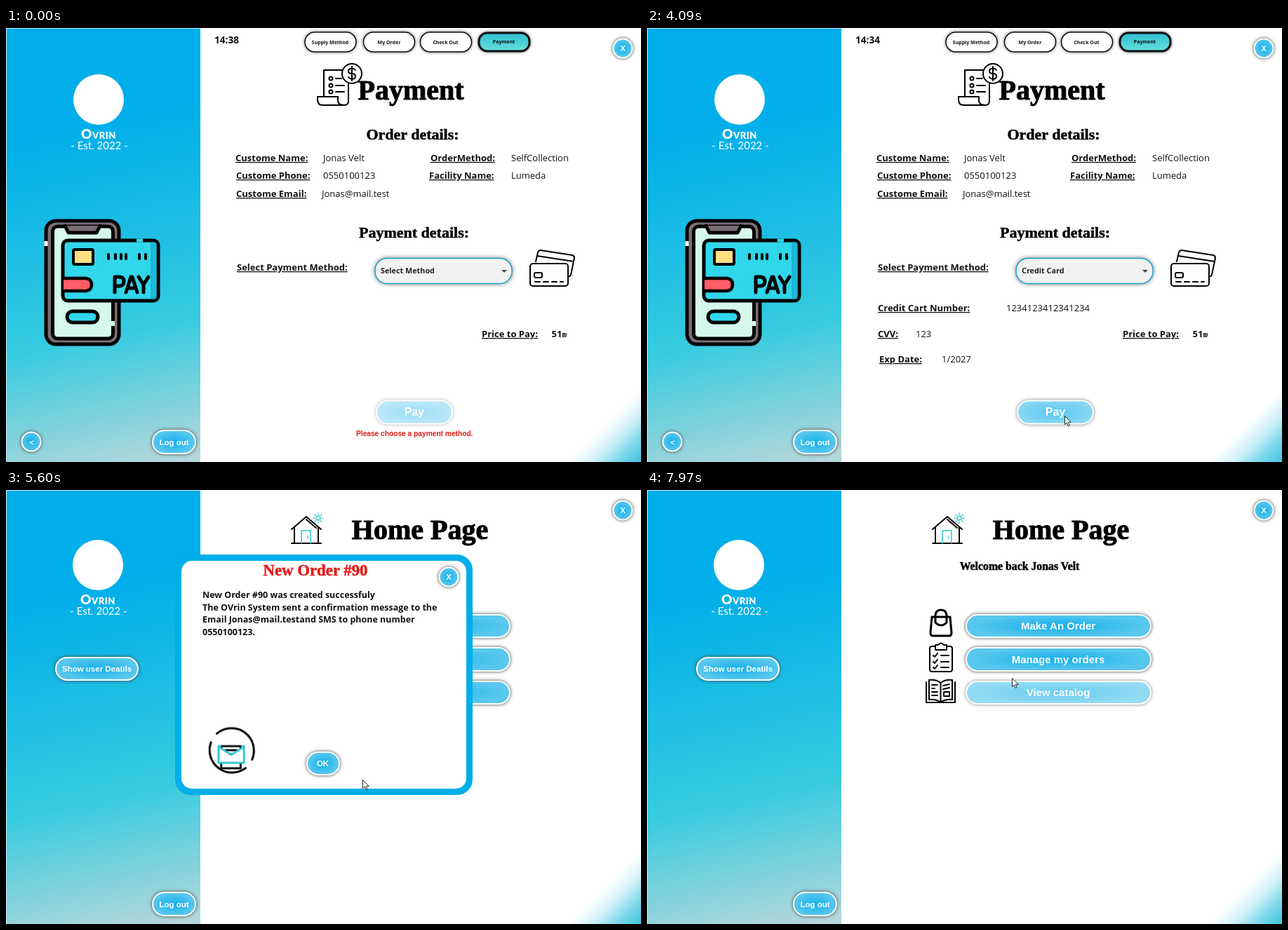
These frames come from a looping animation (905 px wide and 619 px high, 8000 ms). An HTML page:

```html
<!DOCTYPE html>
<html lang="en">
<head>
<meta charset="utf-8">
<title>Payment flow</title>
<style>
html,body{margin:0;width:100%;height:100%;overflow:hidden;background:#fff}
svg{display:block;width:905px;height:619px}
text{font:700 13px "Open Sans","Noto Sans",sans-serif;fill:#111}
.val text,text.val{font-weight:400}
.lab text{text-decoration:underline}
.fat{font:700 22px "Liberation Serif",serif;fill:#000;stroke:#000;stroke-width:.5;text-anchor:middle}
.big{font-size:40px;stroke-width:1}
.combo{font-size:10.8px;fill:#222}
.tab rect{fill:#fff;stroke:#111;stroke-width:1.5;filter:drop-shadow(0 0 2px #666)}
.tab text{font-size:7px;text-anchor:middle}
.pill rect,.pill circle{fill:url(#blue);stroke:#fff;stroke-width:2;filter:drop-shadow(0 0 2.5px #444)}
.pill text{font:700 11.5px "Liberation Sans",Arial,sans-serif;fill:#fff;text-anchor:middle}
.pill .l{font-size:15px}
.ico{fill:none;stroke:#000;stroke-width:2;stroke-linecap:round;stroke-linejoin:round}
.teal{stroke:#2cc6cf}
.brand text{fill:#fff;text-anchor:middle;font:400 15px Lato,sans-serif}
.brand .name{font-weight:900;font-size:19px;font-variant:small-caps;letter-spacing:.5px}
.desk text{font-size:11px;font-weight:400;fill:#fff;text-anchor:middle;filter:drop-shadow(1px 1px 1px #000)}
.note text{font-size:12.5px}

/* hard switches */
.sw{animation:8s step-end infinite}
.in{opacity:0}
.payOut{animation-name:payOut}
.deskOut{animation-name:deskOut}
.dialog{animation-name:dialog}
.c8{animation-name:c8}.c7{animation-name:c7}.c6{animation-name:c6}.c5{animation-name:c5}.c4{animation-name:c4}
.unset{animation-name:unset1}
.chosen{animation-name:chosen}
.popup{animation-name:popup}
.hot{animation-name:hot}
.payBtn{animation-name:payBtn}
.okBtn{animation-name:okBtn}
.catBtn{animation-name:catBtn}
.click{animation-name:click}
.arrow{animation-name:arrow}
@keyframes payOut{0%{opacity:1}56%,100%{opacity:0}}
@keyframes deskOut{0%{opacity:1}60.125%,100%{opacity:0}}
@keyframes dialog{60.125%{opacity:1}93%{opacity:0}}
@keyframes c8{0%{opacity:1}6.75%{opacity:0}}
@keyframes c7{6.75%{opacity:1}19.25%{opacity:0}}
@keyframes c6{19.25%{opacity:1}32%{opacity:0}}
@keyframes c5{32%{opacity:1}44.5%{opacity:0}}
@keyframes c4{44.5%,100%{opacity:1}}
@keyframes unset1{0%{opacity:1}31.125%{opacity:0}}
@keyframes chosen{31.125%,100%{opacity:1}}
@keyframes popup{17.75%{opacity:1}32%{opacity:0}}
@keyframes hot{23.75%,100%{opacity:1}}
@keyframes payBtn{0%{opacity:.42}31.125%{opacity:1}43.6%,100%{opacity:.72}}
@keyframes okBtn{0%{opacity:1}73%,100%{opacity:.7}}
@keyframes catBtn{0%{opacity:1}98%,100%{opacity:.65}}
@keyframes click{15.875%{opacity:.75}17.75%{opacity:0}31.125%{opacity:.75}32%{opacity:0}47.625%{opacity:.75}51.125%{opacity:0}92%{opacity:.75}93%{opacity:0}}
@keyframes arrow{0%{fill:#fff}31.125%{fill:#f8d9a8}32%,100%{fill:#fff}}

/* continuous motion */
.cursor{animation:show 8s step-end infinite,move 8s ease-in-out infinite}
@keyframes show{0%{opacity:0}2.5%,100%{opacity:1}}
@keyframes move{
0%,2.5%{transform:translate(850px,578px)}
10.875%,21.75%{transform:translate(623px,339px)}
26.75%,37%{transform:translate(596px,379px)}
46.75%,61.75%{transform:translate(595px,553px)}
70%{transform:translate(508px,413px)}
75%,94.5%{transform:translate(461px,385px)}
99.6%,100%{transform:translate(520px,268px)}}
.ring{transform-origin:321px 372px;animation:ring 8s linear infinite}
@keyframes ring{0%,61%{transform:rotate(0)}79.25%{transform:rotate(61deg)}97.5%,100%{transform:rotate(180deg)}}
.heads{animation:heads 8s linear infinite}
@keyframes heads{0%,67%{opacity:1}70%,88%{opacity:0}91%,100%{opacity:1}}
.mail{transform-origin:321px 376px;animation:mail 8s ease-in-out infinite}
@keyframes mail{0%,66%{transform:translateY(-5px) scale(.8)}72%,86%{transform:none}92%,100%{transform:translateY(-5px) scale(.8)}}
.letter{animation:letter 8s ease-in-out infinite}
@keyframes letter{0%,68%{transform:translateY(18px);opacity:0}69%{transform:translateY(16px);opacity:1}75%,84%{transform:none;opacity:1}90%{transform:translateY(16px);opacity:1}91%,100%{transform:translateY(18px);opacity:0}}
.sun{transform-origin:445px 40px;animation:sun 8s ease-in-out infinite}
@keyframes sun{0%,66%{transform:scale(0)}69%,73%{transform:rotate(45deg)}76%,92%{transform:scale(0)}96%,100%{transform:none}}
</style>
</head>
<body>
<svg viewBox="0 0 905 619">
<defs>
  <linearGradient id="side" gradientUnits="userSpaceOnUse" x1="100" y1="140" x2="205" y2="625">
    <stop offset="0" stop-color="#00aee9"/><stop offset=".6" stop-color="#35cbe0"/><stop offset="1" stop-color="#b4d7da"/>
  </linearGradient>
  <linearGradient id="corner" gradientUnits="userSpaceOnUse" x1="853" y1="567" x2="905" y2="619">
    <stop offset="0" stop-color="#fff"/><stop offset=".35" stop-color="#cdf0f8"/><stop offset=".65" stop-color="#7fd9ec"/><stop offset="1" stop-color="#3fc2df"/>
  </linearGradient>
  <radialGradient id="blue"><stop offset="0" stop-color="#14b0ea"/><stop offset="1" stop-color="#5ac8ee"/></radialGradient>
  <linearGradient id="tabOn" x2="0" y2="1"><stop offset="0" stop-color="#2fbfd6"/><stop offset="1" stop-color="#66dfd8"/></linearGradient>
  <linearGradient id="dark" x1="0" y1="0" x2="0" y2="1"><stop offset="0" stop-color="#5c1506"/><stop offset="1" stop-color="#8c2a0e"/></linearGradient>
  <linearGradient id="wall" x1=".9" y1="0" x2=".3" y2="1"><stop offset="0" stop-color="#5f1706"/><stop offset=".5" stop-color="#a32a0a"/><stop offset="1" stop-color="#dc4416"/></linearGradient>
  <linearGradient id="glow" x1="0" y1="0" x2=".7" y2="1"><stop offset="0" stop-color="#f37a1c"/><stop offset=".5" stop-color="#fba53c"/><stop offset="1" stop-color="#ffe787"/></linearGradient>
  <linearGradient id="salmon" x1="0" y1="0" x2=".6" y2="1"><stop offset="0" stop-color="#ee6446"/><stop offset=".5" stop-color="#fc8968"/><stop offset="1" stop-color="#ffb48c"/></linearGradient>
  <linearGradient id="rock" x1="0" y1="0" x2=".5" y2="1"><stop offset="0" stop-color="#b04a36"/><stop offset="1" stop-color="#cc6347"/></linearGradient>
  <linearGradient id="low" x1="0" y1="0" x2="0" y2="1"><stop offset="0" stop-color="#c8420f"/><stop offset=".5" stop-color="#8a260c"/><stop offset="1" stop-color="#c2491d"/></linearGradient>

  <g id="shell">
    <path fill="#fff" d="M0 0H905V619H0Z"/>
    <path fill="url(#side)" d="M0 0H277V619H0Z"/>
    <path fill="none" stroke="#c6ebf7" d="M.5 619V.5H277"/>
    <path fill="url(#corner)" d="M801 619L905 515V619Z"/>
    <g class="pill"><circle cx="879" cy="29" r="13.5"/><text x="879" y="33">X</text></g>
    <g class="pill"><rect x="209" y="574" width="61" height="33" rx="16.5"/><text x="239.500" y="595">Log out</text></g>
  </g>
  <g id="brand" class="brand">
    <circle cx="132" cy="102" r="36" fill="#fff"/>
    <text class="name" x="132" y="158">Ovrin</text>
    <text x="133" y="173">- Est. 2022 -</text>
  </g>
</defs>

<!-- home page -->
<g>
  <use href="#shell"/>
  <use href="#brand" x="-1" y="5"/>
  <g class="pill"><rect x="71" y="239" width="117" height="32" rx="16"/><text x="129.500" y="259">Show user Deatils</text></g>
  <g class="ico">
    <path d="M407 56L428 38L449 56M411 53V76M445 53V76M407 76H449M428 42L442 54"/>
    <path class="teal" stroke-width="1.500" d="M421 76V58H434V76M430 66V69"/>
    <g class="sun teal" stroke-width="1.500"><circle cx="445" cy="40" r="3"/>
      <path d="M445 33V34.500M445 45.500V47M438 40H439.500M450.500 40H452M440 35L441 36M449 44L450 45M440 45L441 44M449 36L450 35"/></g>
  </g>
  <text class="fat big" x="590" y="70">Home Page</text>
  <text class="fat" style="font-size:15.8px" x="531" y="114">Welcome back Jonas Velt</text>
  <g class="ico" stroke-width="2.500">
    <path stroke-width="3" d="M406 181H432L434 204Q434 208 430 208H408Q404 208 404 204ZM411 189V178Q412 171 419 171T427 178V189M411 189Q419 197 427 189"/>
    <path d="M411 223H406Q403 223 403 226V256Q403 259 406 259H432Q435 259 435 256V226Q435 223 432 223H427M411 221H415Q419 216 423 221H427V228H411Z"/>
    <path d="M408 236L410 238L414 233M408 245L410 247L414 242M408 253L410 255L414 250M419 236H430M419 245H430M419 253H430"/>
    <path d="M402 271Q412 270 418.500 275Q425 270 435 271V299Q425 298 418.500 303Q412 298 402 299ZM418.500 275V302M398 274V303H439V274"/>
    <path stroke-width="1.800" d="M406 278H414M406 283H410M406 288H414M406 293H414M422 279L431 277M422 284L431 282M423 288H431V294H423Z"/>
  </g>
  <g class="pill">
    <rect x="455" y="178" width="263" height="32" rx="16"/><text class="l" x="586" y="199">Make An Order</text>
    <rect x="455" y="225" width="263" height="33" rx="16"/><text class="l" x="586" y="247">Manage my orders</text>
    <g class="sw catBtn"><rect x="455" y="273" width="263" height="32" rx="16"/><text class="l" x="586" y="294">View catalog</text></g>
  </g>

  <g class="sw in dialog">
    <rect x="241" y="92" width="424" height="343" rx="22" fill="#00aee9"/>
    <rect x="250" y="101" width="406" height="325" rx="15" fill="#fff"/>
    <text class="fat" style="font-size:22.800px;fill:#e81a1a;stroke:#e81a1a" x="441" y="122">New Order #90</text>
    <g class="pill"><circle cx="631" cy="124" r="13.500"/><text x="631" y="128">X</text></g>
    <g class="note">
      <text x="280" y="154">New Order #90 was created successfuly</text>
      <text x="280" y="172">The OVrin System sent a confirmation message to the</text>
      <text x="280" y="189">Email Jonas@mail.testand SMS to phone number</text>
      <text x="280" y="207">0550100123.</text>
    </g>
    <g class="ico" stroke-width="3">
      <g class="ring" style="stroke-width:3"><path d="M291 361A32 32 0 0 1 353 368M351 383A32 32 0 0 1 290 376"/>
        <path class="heads" d="M347 364L353 370L355 362M287 382L289 374L295 380"/></g>
      <g class="mail" style="stroke-width:3">
        <g class="letter"><path fill="#fff" d="M306 384V351H335V384Z"/><path d="M312 357H329M312 363H329M315 369H327"/></g>
        <path class="teal" fill="#fff" d="M302 367L321 379L340 367V391H302Z"/>
        <path class="teal" d="M302 366H305M337 366H340"/>
      </g>
    </g>
    <g class="sw in" style="animation-name:flap"><path class="ico teal" style="stroke-width:3" d="M306 362H336"/></g>
    <g class="pill sw okBtn"><rect x="429" y="374" width="46" height="32" rx="16"/><text x="451.500" y="394">OK</text></g>
  </g>
  <style>@keyframes flap{0%{opacity:1}67%{opacity:0}91%,100%{opacity:1}}</style>
</g>

<!-- desktop -->
<g class="desk sw deskOut">
  <path fill="url(#salmon)" d="M0 0H905V619H0Z"/>
  <path fill="#ffb79c" opacity=".55" d="M425 15Q385 90 420 190T520 320Q640 370 700 440Q560 400 440 350T290 240Q250 170 290 90Q330 40 425 15Z"/>
  <path fill="none" stroke="#ffd9b4" stroke-width="4" opacity=".7" d="M424 18Q395 80 425 140T510 275Q590 320 640 375T715 455M280 110Q250 190 330 290T690 420"/>
  <path fill="url(#glow)" d="M436 11Q405 50 413 100Q425 140 446 172Q470 220 512 270Q570 300 620 335Q650 385 692 405L690 360L630 180L545 55Q490 15 436 11Z"/>
  <path fill="none" stroke="#ffd873" stroke-width="3" opacity=".65" d="M450 20Q430 80 470 130T560 190T620 300M490 30Q500 110 560 150T660 330M445 160Q520 200 600 250T685 380"/>
  <path fill="url(#wall)" d="M420 10Q520 10 570 85Q630 160 660 280Q690 390 708 450Q720 490 738 496Q750 498 770 484L905 456V0H420Z"/>
  <path fill="none" stroke="#d84a18" stroke-width="3" opacity=".35" d="M580 100Q660 160 730 220T905 370M620 170Q700 230 760 330T860 465M650 260Q700 330 730 490M690 0Q760 160 905 250"/>
  <path fill="#5a1706" opacity=".7" d="M430 10Q560 20 640 110Q720 190 790 240Q700 90 560 0H430Z"/>
  <path fill="url(#dark)" d="M0 0H540Q470 5 430 11Q350 25 297 47Q240 105 146 224Q80 262 40 318L0 372Z"/>
  <path fill="none" stroke="#a8380f" stroke-width="3" opacity=".4" d="M20 0Q60 140 0 300M90 0Q110 150 20 310M170 0Q170 110 75 260M260 0Q230 90 130 220M420 0Q270 30 210 130"/>
  <path fill="#f09a7c" d="M35 330L78 272L148 222Q200 280 260 340L160 425Z"/>
  <path fill="url(#low)" d="M0 372L35 328L158 424L160 560L192 619H0Z"/>
  <path fill="none" stroke="#e4682e" stroke-width="3" opacity=".45" d="M0 400Q70 400 155 450M0 440Q70 450 158 490M0 540Q80 560 160 555M0 590Q80 590 180 610"/>
  <path fill="url(#rock)" d="M78 272L140 238Q205 300 310 360Q360 385 420 465L330 570L318 619H196Q170 560 159 500L158 424Q130 380 110 330Q100 280 78 272Z"/>
  <path fill="none" stroke="#e28a6c" stroke-width="2" opacity=".4" d="M115 330Q250 360 410 455M135 370Q260 400 395 475M160 430Q260 440 380 505M165 500Q240 490 340 555M180 560Q240 540 320 590"/>
  <path fill="#8a453e" d="M316 619Q315 575 350 550Q400 525 400 485L420 464Q435 520 520 530Q590 545 625 619Z"/>
  <path fill="#b85b47" d="M420 464Q430 520 520 530Q590 545 625 619H500Q430 570 400 490Z"/>
  <path fill="#e07a60" d="M432 492Q560 525 640 508T745 495L840 505L905 517V619H632Q610 560 570 545Q480 530 432 492Z"/>
  <path fill="none" stroke="#f3a586" stroke-width="3" opacity=".5" d="M540 530Q680 515 905 545M600 560Q720 540 905 580M625 595Q750 575 905 605"/>
  <path fill="#f47b3c" d="M760 488L905 457V515L818 500Z"/>
  <g>
    <path fill="#f6fafc" d="M25 60H66V88H25Z"/><path fill="#2aa3e0" d="M25 60H38V88H25Z"/>
    <circle cx="51" cy="67" r="4" fill="#888"/><path stroke="#5bbbe4" stroke-width="2" d="M46 83H57"/><path stroke="#ccd" d="M44 75H58M44 78H55"/>
    <path fill="#fff" d="M32 142H53L61 150V181H32Z"/><path fill="#cfd8de" d="M53 142V150H61Z"/>
    <rect x="37" y="152" width="19" height="20" rx="3" fill="#2196d6"/><path fill="#8fd3f5" d="M37 168L44 160L56 170V172H37Z"/><circle cx="51" cy="157" r="2" fill="#fff"/>
    <circle cx="28" cy="87" r="4" fill="#d8351e"/><circle cx="28" cy="180" r="4" fill="#d8351e"/>
    <path stroke="#fff" d="M26.500 85.500L29.500 88.500M29.500 85.500L26.500 88.500M26.500 178.500L29.500 181.500M29.500 178.500L26.500 181.500"/>
    <text x="46" y="13">Chat</text><text x="46" y="106">login</text><text x="46" y="199">order</text>
    <text x="1" y="385">er</text><text x="1" y="493">s)</text><text x="3" y="570">o</text>
  </g>
</g>

<!-- payment page -->
<g class="sw payOut">
  <use href="#shell"/>
  <use href="#brand"/>
  <g class="pill"><circle cx="36" cy="590" r="13.500"/><text x="36.500" y="595">&lt;</text></g>

  <g stroke="#000" stroke-width="5" stroke-linecap="round" stroke-linejoin="round">
    <rect x="57" y="275" width="104" height="176" rx="14" fill="#7a6f77"/>
    <rect x="66.500" y="283" width="86" height="160" rx="7" fill="#d5f8eb"/>
    <path fill="#7a6f77" d="M84 282L89 292H129L134 282"/>
    <path stroke="#fff" stroke-linecap="butt" d="M57 304V311"/><path stroke="#d5f8eb" stroke-linecap="butt" d="M152.500 418V425"/>
    <rect x="81" y="303" width="136" height="86" rx="7" fill="#30d6ea"/>
    <path fill="#1bb8d8" stroke="none" d="M206 305.500H211Q214.500 305.500 214.500 309V383Q214.500 386.500 211 386.500H206Z"/>
    <path stroke="#30d6ea" stroke-linecap="butt" d="M186 303H195"/>
    <rect x="96" y="316" width="28" height="21" rx="2" fill="#ffdf82" stroke-width="4"/>
    <path stroke-width="4" fill="none" d="M146 323V329M156 323V329M164 323V329M171 323V329M190 323V329M199 323V329"/>
    <path fill="#ff5d68" stroke-width="4.500" d="M82 357H114Q122 358 122 366T114 375H82"/>
    <rect x="87" y="404" width="44" height="16" rx="8" fill="#30d6ea"/>
    <path fill="none" d="M155 377V355H161Q168 355 168 361.500T161 368H155M171 377L178 355H180L187 377M174 371H184M189 355L196 366L203 355M196 366V377"/>
  </g>

  <text style="font-size:13.600px" x="297" y="22">14:3</text>
  <g style="font-size:13.600px">
    <text class="sw in c8" style="font-size:13.600px" x="324.200" y="22">8</text>
    <text class="sw in c7" style="font-size:13.600px" x="324.200" y="22">7</text>
    <text class="sw in c6" style="font-size:13.600px" x="324.200" y="22">6</text>
    <text class="sw in c5" style="font-size:13.600px" x="324.200" y="22">5</text>
    <text class="sw in c4" style="font-size:13.600px" x="324.200" y="22">4</text>
  </g>
  <g class="tab">
    <rect x="426" y="6" width="73" height="28" rx="14"/><text x="462" y="23">Supply Method</text>
    <rect x="509.500" y="6" width="73" height="28" rx="14"/><text x="546" y="23">My Order</text>
    <rect x="590.500" y="6" width="73" height="28" rx="14"/><text x="626.500" y="23">Check Out</text>
    <rect style="fill:url(#tabOn);stroke-width:3" x="674" y="7" width="72" height="26" rx="12"/><text x="709.500" y="22">Payment</text>
  </g>

  <g class="ico">
    <path d="M479 60H453V98M488 80V104Q488 110 482 110H451Q444 110 444 102V98H473V104Q474 110 481 110"/>
    <circle cx="493" cy="65" r="14"/>
    <circle cx="463" cy="72" r="2.500"/><circle cx="463" cy="82" r="2.500"/><circle cx="463" cy="91" r="2.500"/>
    <path d="M470 72H478M470 82H482M470 91H482"/>
    <path d="M498 60Q496 57.500 493 57.500Q488 58 488 61.500Q488 65 493 65T498 69T493 72.500Q489 72.500 488 70M493 55V75"/>
    <rect x="747" y="336" width="54" height="32" rx="4"/>
    <path d="M755 333L758 320Q759 317 762 317L807 324Q810 325 810 328L805 352Q804 355 801 354M757 325L809 333"/>
    <rect x="753" y="349" width="11" height="7" rx="2"/>
    <path stroke-dasharray="7 5" d="M754 362H794"/>
  </g>
  <text class="fat big" x="577" y="102">Payment</text>
  <text class="fat" x="579.500" y="159">Order details:</text>
  <text class="fat" x="581.500" y="299">Payment details:</text>

  <g class="lab">
    <text x="327" y="190">Custome Name:</text><text x="328" y="215">Custome Phone:</text><text x="328" y="241">Custome Email:</text>
    <text x="605" y="190">OrderMethod:</text><text x="603" y="215">Facility Name:</text>
    <text x="329" y="346">Select Payment Method:</text><text x="678" y="441">Price to Pay:</text>
  </g>
  <g class="val">
    <text x="452" y="190">Jonas Velt</text><text x="452" y="215">0550100123</text><text x="450" y="241">Jonas@mail.test</text>
    <text x="720" y="190">SelfCollection</text><text x="720" y="215">Lumeda</text>
  </g>
  <text x="777.500" y="441">51<tspan font-size="8" style="font-size:8px">₪</tspan></text>

  <g class="sw in chosen">
    <g class="lab"><text x="329" y="404">Credit Cart Number:</text><text x="329" y="441">CVV:</text><text x="331" y="477">Exp Date:</text></g>
    <g class="val"><text x="512" y="404">1234123412341234</text><text x="383" y="441">123</text><text x="420" y="477">1/2027</text></g>
  </g>

  <rect x="526" y="328.500" width="195" height="36" rx="17" fill="#f2f2f2" stroke="#1ba3cf" stroke-width="1.500" style="filter:drop-shadow(0 0 3px #777)"/>
  <path fill="#444" d="M706 345H714L710 349Z"/>
  <text class="combo sw in unset" x="534" y="350">Select Method</text>
  <text class="combo sw in chosen" x="534" y="350">Credit Card</text>

  <g class="sw payBtn pill"><rect x="528" y="531.500" width="108" height="33" rx="16.500"/><text style="font-size:16px" x="582" y="553">Pay</text></g>
  <text class="sw in unset" style="font:700 10.200px 'Liberation Sans',Arial,sans-serif;fill:#e01b10" x="499" y="582">Please choose a payment method.</text>

  <g class="sw in popup">
    <rect x="526" y="364.500" width="195" height="50" fill="#fff" stroke="#c4c4c4" style="filter:drop-shadow(0 3px 4px #888)"/>
    <text class="combo" x="531" y="381">Credit Card</text>
    <text class="combo" x="531" y="405">Monthly Payment</text>
    <g class="sw in hot"><path fill="#0096c9" d="M526 365H721V389H526Z"/><text class="combo" style="fill:#fff" x="531" y="381">Credit Card</text></g>
  </g>
</g>

<g class="cursor">
  <circle class="sw in click" r="11.500" fill="#5cb84e"/>
  <path class="sw arrow" fill="#fff" stroke="#111" stroke-width=".9" d="M.5 .5V12.500L3.300 10L5.200 14.500L7.200 13.700L5.300 9.300H9.200Z"/>
</g>
</svg>
</body>
</html>
```
